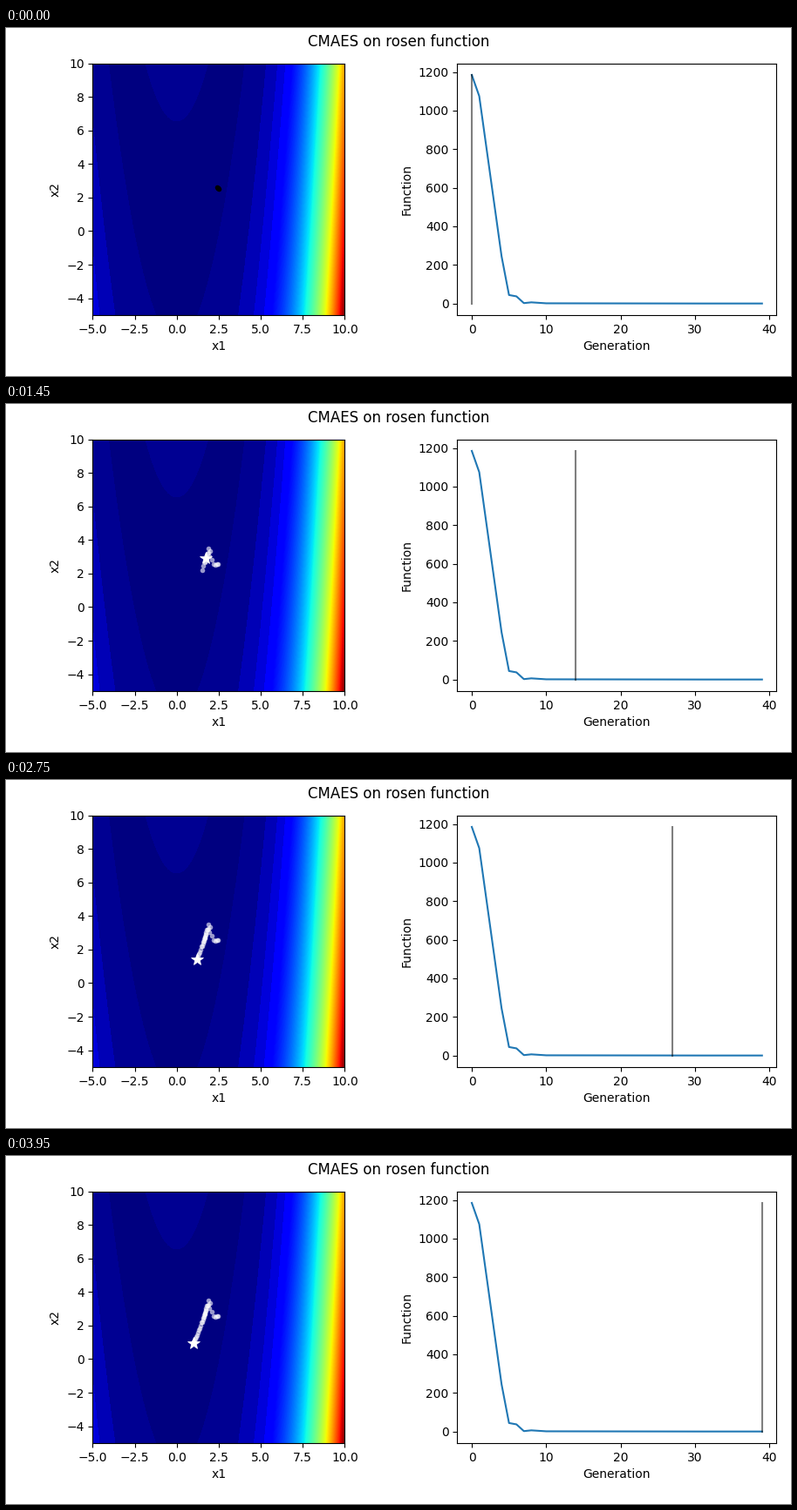
A matplotlib script for the animation above (4 s loop, 900 by 400 pixels).

```python
import matplotlib.pyplot as plt
import numpy as np
from matplotlib.animation import FuncAnimation

W, H, DPI = 900, 400, 100
GENS, POP = 40, 6


def rosen(x, y):
    return 100 * (y - x ** 2) ** 2 + (1 - x) ** 2


def glide(*keys):
    """Value per generation, linear between (generation, value) keys."""
    return np.interp(np.arange(GENS), *zip(*keys))


def axes_px(left, top, right, bottom):
    return fig.add_axes([left / W, 1 - bottom / H,
                         (right - left) / W, (bottom - top) / H])


def cloud(g):
    """Candidates: widening at first, then contracting along the valley."""
    searching = g < 8
    spread = 0.03 * 1.45 ** g if searching else max(0.4 * 0.85 ** (g - 7), 0.035)
    tilt = -0.6 if searching else 2.2
    u, v = np.clip(rng.normal(size=(2, POP)), -1.6, 1.6)
    center = (path[max(g - 1, 0)] + path[g]) / 2
    return center + spread * np.column_stack([u, tilt * u + 0.5 * v])


# The best point descends into the valley y = x**2, then follows it to (1, 1)
fitness = glide((0, 1185), (1, 1075), (4, 245), (5, 44), (6, 37),
                (7, 2), (8, 6), (10, 1), (31, 0))
best_x = glide((0, 2.45), (1, 2.42), (4, 2.1), (6, 1.91), (7, 1.9), (9, 1.83),
               (11, 1.52), (15, 1.79), (20, 1.6), (31, 1), (39, 0.98))
gap = np.sqrt(np.maximum(fitness - (1 - best_x) ** 2, 0)) / 10
path = np.column_stack([best_x, best_x ** 2 - gap])

rng = np.random.default_rng(4)
clouds = [cloud(g) for g in range(GENS)]

fig = plt.figure(figsize=(W / DPI, H / DPI), dpi=DPI)
fig.suptitle("CMAES on rosen function", y=0.9825)

ax = axes_px(99.4, 40.8, 388.4, 329.8)
xs = np.linspace(-5, 10, 101)
X, Y = np.meshgrid(xs, xs)
Z = rosen(X, Y)
# Broad bands in the blues, fine ones above
levels = Z.max() / 256 * np.r_[0, 1, 8:32:8, 32:257]
ax.contourf(X, Y, Z, levels, cmap="jet", vmin=0, vmax=Z.max())
ax.set(xlim=(-5, 10), ylim=(-5, 10), xlabel="x1", ylabel="x2",
       xticks=np.arange(-5, 10.1, 2.5), yticks=np.arange(-4, 10.1, 2))
trail, = ax.plot([], [], "wo", ms=4, mew=0, alpha=0.6, zorder=3)
star, = ax.plot([], [], "w*", ms=10, mew=0.5, zorder=4)
dots, = ax.plot([], [], "ko", ms=4, mew=0, zorder=5)

ax2 = axes_px(517.4, 40.8, 883.4, 329.8)
ax2.plot(fitness, lw=1.5)
ax2.set(xlabel="Generation", ylabel="Function",
        xticks=range(0, 41, 10), yticks=range(0, 1201, 200),
        xlim=(-1.95, 40.95), ylim=(-59.25, 1244.25))
cursor, = ax2.plot([0, 0], [0, 1185], "k", lw=1.5, alpha=0.5)


def update(n):
    # Even steps sample a new cloud, odd steps move to its best point
    g = max(n - 1, 0) // 2
    shown = path[:g + 1] if n else path[:0]
    trail.set_data(*shown[:-1].T)
    star.set_data(*shown[-1:].T)
    dots.set_data(*(path[:0] if n % 2 else clouds[n // 2]).T)
    cursor.set_xdata([g, g])
    return trail, star, dots, cursor


anim = FuncAnimation(fig, update, frames=2 * GENS, interval=50,
                     repeat=True, repeat_delay=0)
plt.show()
```
